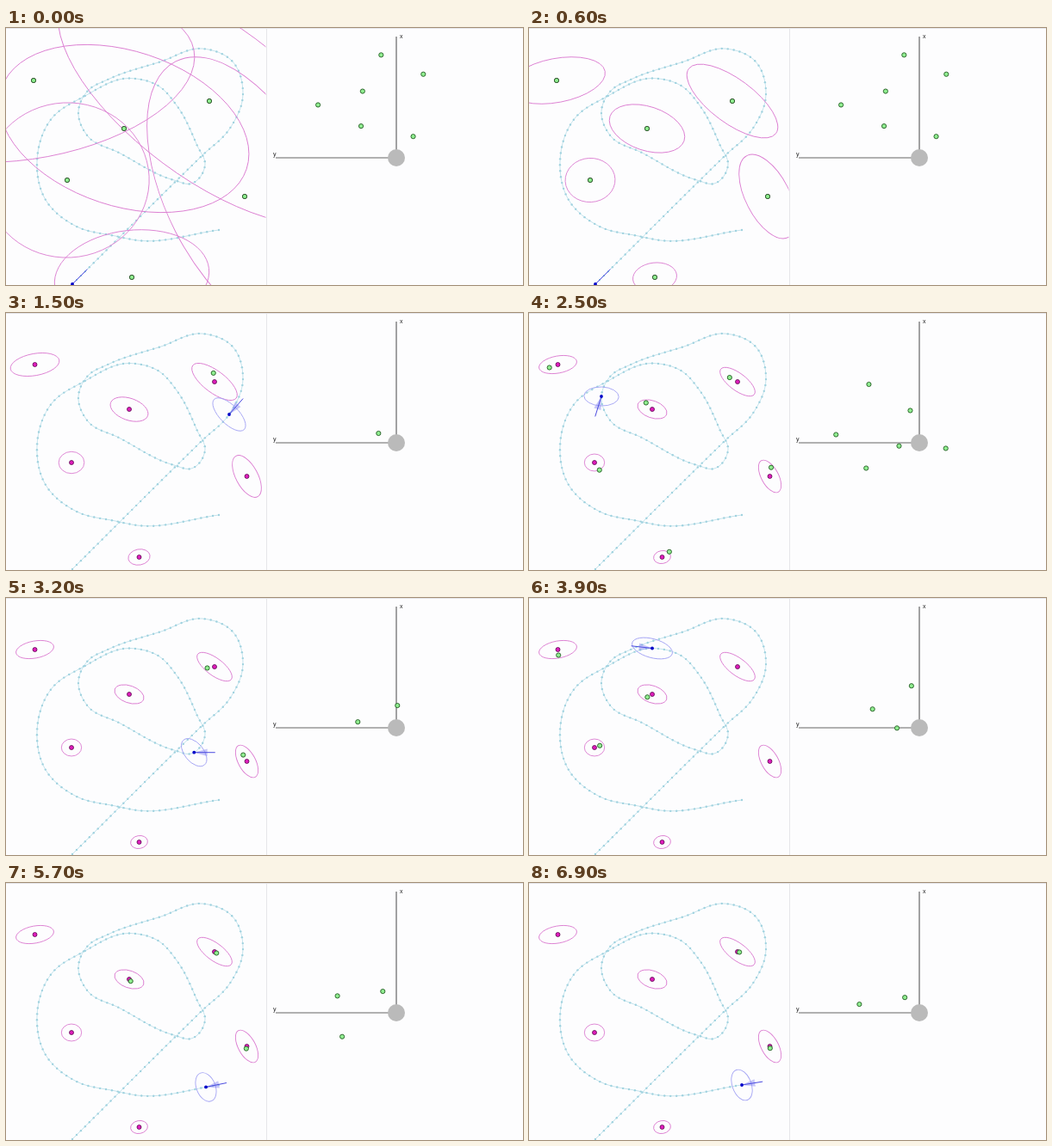
Write an HTML page that moves like this. It is 600 px wide and 299 px high and loops after 7100 ms.

```html
<!DOCTYPE html>
<html lang="en">
<head>
<meta charset="utf-8">
<title>Landmark mapping</title>
<style>
  html, body { margin: 0; width: 100%; height: 100%; overflow: hidden; background: #fdfdfe; }
  svg { display: block; width: 600px; height: 299px; }
  text { font: 7px "Liberation Sans", Arial, sans-serif; fill: #222; }
</style>
</head>
<body>
<svg viewBox="0 0 600 299">
  <defs><clipPath id="mapArea"><rect width="301.5" height="299"/></clipPath></defs>
  <path d="M0 .5H600M302.5 0V299" stroke="#e6e6ea" fill="none"/>
  <g id="map" clip-path="url(#mapArea)"></g>
  <path d="M453 10V151M313 151H453" stroke="#666" stroke-width="1.2" fill="none"/>
  <circle cx="453" cy="151" r="10" fill="#bababa"/>
  <text x="457" y="12">x</text>
  <text x="310" y="148.5">y</text>
  <g id="sensor"></g>
</svg>
<script>
const LOOP = 7100, STEP = 100, START = 600, END = 6100;
const SCALE = 0.455, RANGE = 222, VIEW = 120;
const NS = "http://www.w3.org/2000/svg";
const DEG = Math.PI / 180;
const map = document.getElementById("map");
const sensor = document.getElementById("sensor");

function set(el, attrs) {
  for (const name in attrs) el.setAttribute(name, attrs[name]);
}
function add(parent, tag, attrs) {
  const el = document.createElementNS(NS, tag);
  set(el, attrs);
  parent.append(el);
  return el;
}
const mix = (a, b, k) => a + (b - a) * k;
const clamp = v => Math.max(0, Math.min(1, v));
const polar = (r, angle) => [r * Math.cos(angle), r * Math.sin(angle)];

// The route is a smooth curve through a few waypoints.
const waypoints = [
  [77, 298], [228, 148], [259, 118], [275, 77], [262, 38], [228, 24], [180, 39],
  [118, 60], [96, 72], [84, 97], [95, 126], [131, 145], [195, 177], [215, 181],
  [231, 159], [222, 137], [198, 90], [178, 68], [143, 58.5], [90, 80], [54, 104],
  [36, 155], [46, 200], [82, 231], [127, 242], [152, 247], [247, 235]
];
const home = waypoints[0];

function chord(a, b) {
  const dx = b[0] - a[0], dy = b[1] - a[1], length = Math.hypot(dx, dy);
  return { length, x: dx / length, y: dy / length };
}
// Unit tangent: neighbouring chords, the shorter one weighing more.
function tangent(i) {
  const p = waypoints[i];
  const chords = [];
  if (i > 0) chords.push(chord(waypoints[i - 1], p));
  if (i < waypoints.length - 1) chords.push(chord(p, waypoints[i + 1]));
  const x = chords.reduce((sum, c) => sum + c.x / c.length, 0);
  const y = chords.reduce((sum, c) => sum + c.y / c.length, 0);
  const size = Math.hypot(x, y);
  return [x / size, y / size];
}
const segments = waypoints.map((p, i) => {
  if (!i) return `M${p}`;
  const from = waypoints[i - 1];
  const reach = chord(from, p).length / 3;
  const out = tangent(i - 1), into = tangent(i);
  return `C${from.map((v, j) => v + out[j] * reach)} ${p.map((v, j) => v - into[j] * reach)} ${p}`;
});

const route = add(map, "path", { fill: "none", stroke: "#c4e4ed", "stroke-width": 1 });
function lengthTo(index) {
  route.setAttribute("d", segments.slice(0, index + 1).join(""));
  return route.getTotalLength();
}
// Arrival times at some waypoints; the speed between them is constant.
const arrivals = [[START, 0], [1500, 2], [2500, 9], [3900, 18], [5000, 24], [5800, 26]]
  .map(([time, index]) => ({ time, length: lengthTo(index) }));
const total = route.getTotalLength();
const dotCount = Math.round(total / 7);
for (let i = 0; i <= dotCount; i++) {
  const p = route.getPointAtLength(total * i / dotCount);
  add(map, "circle", { cx: p.x, cy: p.y, r: 1.2, fill: "#a0d2df" });
}

function travelled(t) {
  return arrivals.slice(1).reduce((sum, stop, i) => {
    const from = arrivals[i];
    const k = clamp((t - from.time) / (stop.time - from.time));
    return sum + k * (stop.length - from.length);
  }, 0);
}

// The heading estimate trails the motion a little.
function poseAt(t) {
  const s = travelled(t);
  const at = route.getPointAtLength(Math.max(1, s));
  const back = route.getPointAtLength(Math.max(0, s - 16));
  const { x, y } = route.getPointAtLength(s);
  return { x, y, heading: Math.atan2(at.y - back.y, at.x - back.x) };
}

// from: first estimate, to: settled estimate, phase: direction of the measuring error in degrees
const landmarks = [
  { from: [32, 61], to: [33.5, 60], phase: 264 },
  { from: [236, 85], to: [242, 80], phase: -48 },
  { from: [137, 117], to: [143, 112], phase: -30 },
  { from: [71, 177], to: [76, 174], phase: 160 },
  { from: [277, 196], to: [279.5, 190], phase: 22 },
  { from: [146, 290], to: [154.5, 284], phase: 67 }
];
const ring = { fill: "none", stroke: "#dc7fd2", "stroke-width": 0.9 };
const green = { r: 2.6, fill: "#90ee90", stroke: "#245c24", "stroke-width": 0.9 };
for (const mark of landmarks) mark.ring = add(map, "ellipse", ring);
for (const mark of landmarks) {
  mark.core = add(map, "circle", { r: 2.5, fill: "#e01cbc", stroke: "#5a1050", "stroke-width": 0.8 });
  mark.seen = add(map, "circle", green);
  mark.echo = add(sensor, "circle", green);
}
const poseRing = add(map, "ellipse", { fill: "none", stroke: "#a4a4f4", "stroke-width": 0.9 });
const fan = add(map, "path", { fill: "#8484f0", "fill-opacity": 0.45 });
const needle = add(map, "path", { stroke: "#4a4ae0", fill: "none" });
const robot = add(map, "circle", { r: 1.9, fill: "#0000c8" });

// Ellipse whose axes lie along and across the line of sight from the start of the route.
function drawSpread(el, [x, y], along, across) {
  const sight = Math.atan2(y - home[1], x - home[0]) / DEG;
  set(el, { rx: along, ry: across, transform: `translate(${x} ${y}) rotate(${sight})` });
}

function drawRobot({ x, y, heading }, t) {
  const grown = clamp((t - START) / 900);
  const distance = Math.hypot(x - home[0], y - home[1]);
  drawSpread(poseRing, [x, y], 11 * grown, Math.hypot(0.09 * distance, 9 * grown));

  const half = 0.27 * grown;
  const [ax, ay] = polar(16, heading - half);
  const [bx, by] = polar(16, heading + half);
  set(fan, { d: `M${x} ${y}l${ax} ${ay}L${x + bx} ${y + by}Z` });
  set(needle, { d: `M${x} ${y}l${polar(24.5, heading)}` });
  set(robot, { cx: x, cy: y });
}

function drawLandmark(mark, pose, t) {
  const settled = clamp((t - START) / 900);
  const [x, y] = mark.from.map((v, i) => mix(v, mark.to[i], settled));

  // Repeated sightings shrink the uncertainty, which starts out wider with distance.
  const shrink = 1 / Math.sqrt(1 + 10 * Math.min(t / START, 3.5) ** 1.6);
  const distance = Math.hypot(mark.from[0] - home[0], mark.from[1] - home[1]);
  drawSpread(mark.ring, [x, y],
    Math.hypot(90 * shrink ** 1.06, 4), Math.hypot(0.785 * distance * shrink, 4));
  set(mark.core, { cx: x, cy: y });

  // The measuring error swells, turns slowly and fades out.
  const p = clamp((t - START) / (END - START));
  const [ex, ey] = polar(120 * p * Math.exp(-4 * p), (mark.phase - 300 * p) * DEG);
  const dx = x + ex - pose.x, dy = y + ey - pose.y;
  const bearingOf = (vx, vy) => {
    const turn = pose.heading - Math.atan2(vy, vx);
    return Math.atan2(Math.sin(turn), Math.cos(turn));
  };
  const inRange = t <= START || Math.hypot(x - pose.x, y - pose.y) < RANGE;
  const inView = Math.abs(bearingOf(x - pose.x, y - pose.y)) < VIEW * DEG;
  const display = inRange && inView ? "inline" : "none";
  const [ahead, left] = polar(Math.hypot(dx, dy) * SCALE, bearingOf(dx, dy));
  set(mark.seen, { cx: x + ex, cy: y + ey, display });
  set(mark.echo, { cx: 453 - left, cy: 151 - ahead, display });
}

function draw(time) {
  const t = Math.min(END, Math.floor(time % LOOP / STEP) * STEP);
  const pose = poseAt(t);
  drawRobot(pose, t);
  for (const mark of landmarks) drawLandmark(mark, pose, t);
}

const begin = performance.now();
function tick() {
  draw(performance.now() - begin);
  requestAnimationFrame(tick);
}
tick();
</script>
</body>
</html>
```
